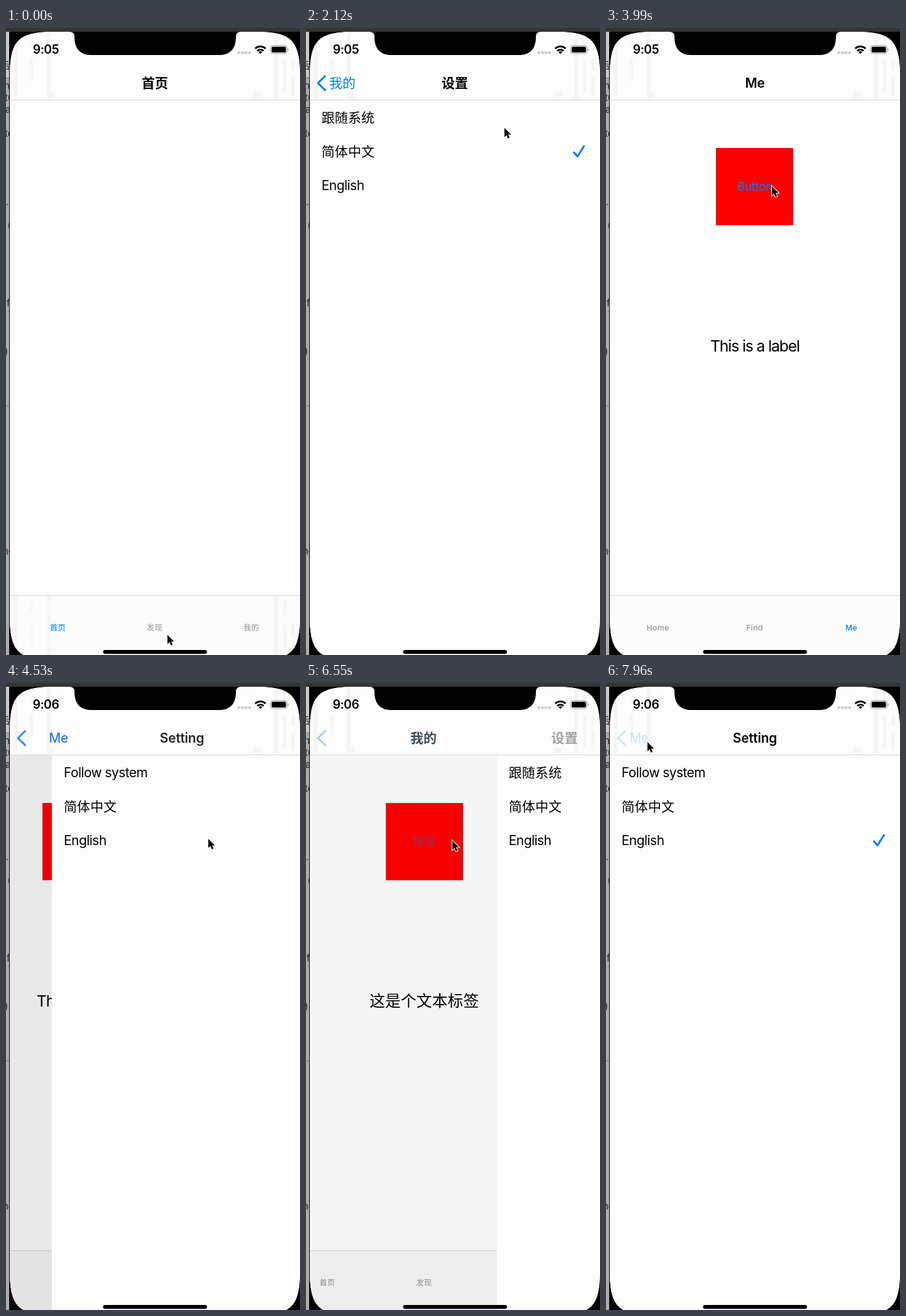
Recreate the animation shown at these times as an HTML page. Size 468x998 px, loop 8000 ms.

```html
<!DOCTYPE html>
<html lang="zh-CN">
<head>
<meta charset="utf-8">
<title>Language settings</title>
<style>
  html, body { margin: 0; width: 100%; height: 100%; overflow: hidden; background: #000; }
  svg { display: block; width: 468px; height: 998px; }
  text { font-family: Inter, "Noto Sans CJK SC", "Noto Sans CJK", sans-serif; font-size: 20.9px; letter-spacing: -.026em; fill: #000; }
  .mid { text-anchor: middle; }
  .bold { font-weight: 600; letter-spacing: -.01em; }
  .blue { fill: #007aff; }
  .label { font-size: 24.7px; letter-spacing: -.045em; }
  .button { font-size: 18.5px; letter-spacing: -.01em; fill: #007aff; }
  .tabs text { font-size: 12.3px; font-weight: 500; letter-spacing: .02em; text-anchor: middle; }
  .zh text, text.zh { letter-spacing: .008em; }
  #stage .clock { font-size: 19.4px; letter-spacing: -.025em; }
  #stage .latin { letter-spacing: -.024em; }
  #stage .desk text { font-size: 15px; fill: #222; letter-spacing: 0; }
  .line { stroke: #d4d4d4; }
  .mark { fill: none; stroke: #007aff; stroke-width: 3; stroke-linecap: round; stroke-linejoin: round; }
</style>
</head>
<body>
<svg id="stage" viewBox="0 0 468 998">
  <defs>
    <clipPath id="screen">
      <path d="M6 79C6 19 19 6 79 6H395C455 6 468 19 468 79V933C468 993 455 1006 395 1006H79C19 1006 6 993 6 933Z"/>
    </clipPath>
    <clipPath id="edge"><rect width="5" height="998"/></clipPath>
    <filter id="soft"><feGaussianBlur stdDeviation="1"/></filter>
    <g id="haze" fill="#f4f4f4" filter="url(#soft)">
      <path d="M12 6h6v106h-6zM65 6h6v106h-6zM427 6h6v106h-6z"/>
      <path d="M39 14h4v16h-4zM39 52h4v34h-4zM441 12h5v24h-5zM441 52h5v50h-5zM454 50h6v18h-6zM454 78h6v30h-6z"/>
      <path d="M66 102h11v9h-11zM394 103h13v8h-13z"/>
    </g>
  </defs>

  <rect width="468" height="998" fill="#b1abab"/>
  <rect width="6" height="80" fill="#cbc8c8"/>
  <g class="desk" id="desk" clip-path="url(#edge)"><path d="M0 79.500h6M0 601.500h6" stroke="#777"/></g>
  <rect x="5" y="0" width="463" height="998"/>
  <rect width="468" height="6" fill="#343434"/>

  <g clip-path="url(#screen)">
    <rect x="6" y="6" width="462" height="992" fill="#fdfdfd"/>
    <g id="under">
      <rect x="6" y="114" width="462" height="884" fill="#fdfdfd"/>
      <g id="me">
        <rect x="175.400" y="190.700" width="123" height="123" fill="#f00" shape-rendering="crispEdges"/>
        <text class="mid button" id="button" x="237" y="258.700"/>
        <text class="mid label" id="label" x="237" y="514.800"/>
      </g>
      <rect id="tabBack" x="6" y="904" width="462" height="94"/>
      <use href="#haze" id="tabHaze" y="898"/>
      <path class="line" d="M6 903.500h462"/>
      <g class="tabs" id="tabs"></g>
      <rect id="dim" x="6" y="114" width="462" height="884"/>
    </g>
    <g id="over">
      <rect x="6" y="114" width="462" height="884" fill="#fdfdfd" shape-rendering="crispEdges"/>
      <g id="rows"></g>
      <path class="mark" id="check" d="M426.500 198l5.800 6.500L442.500 188"/>
    </g>

    <rect x="6" y="6" width="462" height="108" fill="#fdfdfd"/>
    <use href="#haze"/>
    <path class="line" d="M6 114.500h462"/>
    <path class="mark" id="chevron" d="M30.500 76.500L19 87.700l11.500 11.200"/>
    <text class="mid blue" id="backLabel" y="95"/>
    <text class="mid bold" id="meTitle" y="95"/>
    <text class="mid bold" id="setTitle" y="95"/>

    <text class="mid bold clock" id="clock" x="63.400" y="41.200"/>
    <g fill="#c9c9c9"><circle cx="370.500" cy="39.300" r="2.300"/><circle cx="376.500" cy="39.300" r="2.300"/><circle cx="382" cy="39.300" r="2.300"/><circle cx="387.600" cy="39.300" r="2.300"/></g>
    <g fill="none" stroke="#000" stroke-width="2.700">
      <path d="M396.700 32.800a12 12 0 0 1 16.600 0M400 36.400a7.300 7.300 0 0 1 10 0"/>
    </g>
    <path d="M405 41.300l-2.900-3a4.200 4.200 0 0 1 5.800 0z"/>
    <rect x="421" y="28" width="26.500" height="12.800" rx="3.600" fill="none" stroke="#999"/>
    <rect x="422.800" y="29.800" width="22.900" height="9.200" rx="2.100"/>
    <path d="M449 32.300q2 2 0 4.400z" fill="#888"/>
    <path d="M101 6Q109 6 109 14C109 33 118 43 136 43H339C357 43 366 33 366 14Q366 6 374 6Z"/>
    <rect x="154.500" y="990" width="165.500" height="6.200" rx="3.100"/>
  </g>

  <circle id="touch" r="24.500" fill="#ccc" fill-opacity=".9" stroke="#999"/>
  <path id="cursor" d="M0 0V14.500L3.300 11.500L5.700 16.800L8.200 15.700L5.900 10.600H10.500Z" stroke="#fff" stroke-width="2" paint-order="stroke"/>
</svg>

<script>
const LOOP = 8000, WIDTH = 462, SLIDE = 500, PARALLAX = .297;
const $ = id => document.getElementById(id);

const words = {
  zh: { home: '首页', find: '发现', me: '我的', set: '设置', system: '跟随系统', button: '按钮', label: '这是个文本标签', back: 58 },
  en: { home: 'Home', find: 'Find', me: 'Me', set: 'Setting', system: 'Follow system', button: 'Button', label: 'This is a label', back: 52.5 }
};

// Timeline, in ms
const TAB_AT = 620, MINUTE_AT = 4350;
const slides = [[1580, 0], [3087, 1], [4294, 0], [5870, 1], [6483, 0]];
const choices = [[0, 'zh', 1], [2560, 'en', 0], [5200, 'zh', 1], [7420, 'en', 2]];
const touches = [[450, 600], [1350, 1470], [2440, 2550], [2910, 3060], [4120, 4260],
  [5080, 5190], [5750, 5850], [6350, 6460], [7300, 7410]];
const backPresses = [[2910, 3087], [5750, 5870], [7950, 8000]];
const buttonPresses = [[1350, 1570], [4120, 4294], [6350, 6483]];
const path = [[90, 257, 966], [430, 415, 969], [890, 415, 969], [1320, 281, 306], [1600, 281, 306],
  [2210, 318, 150], [2560, 318, 150], [2880, 46, 88], [3040, 46, 88], [3280, 310, 246],
  [3750, 264, 252], [4270, 264, 252], [4530, 322, 248], [5000, 318, 206], [5200, 318, 206],
  [5560, 42, 70], [5860, 42, 70], [6300, 233, 251], [6560, 233, 251], [6980, 290, 262],
  [7430, 290, 262], [7780, 66, 94]];

// Title travel against page travel
const pushTitle = [[0, 0], [.147, .17], [.65, .726], [1, 1]];
const popTitle = [[0, 0], [.768, .737], [1, 1]];
const pushSet = [[0, 0], [.147, 43.5], [.65, 176], [1, 235]];
const popSet = [[0, 0], [.768, 189.5], [1, 235]];

const linear = u => u;
const smooth = u => u * u * (3 - 2 * u);
const within = (t, spans) => spans.some(([a, b]) => t >= a && t < b);
const latest = (t, list) => list.filter(item => t >= item[0]).pop();

function sample(keys, t, col = 1, ease = linear) {
  const i = keys.findIndex(k => k[0] > t);
  if (i === 0) return keys[0][col];
  if (i < 0) return keys[keys.length - 1][col];
  const a = keys[i - 1], b = keys[i];
  return a[col] + (b[col] - a[col]) * ease((t - a[0]) / (b[0] - a[0]));
}

function addText(parent, x, y, str = '', cls = '') {
  const el = document.createElementNS('http://www.w3.org/2000/svg', 'text');
  el.setAttribute('x', x);
  el.setAttribute('y', y);
  el.setAttribute('class', cls);
  el.textContent = str;
  return parent.appendChild(el);
}

function setText(el, str) {
  if (el.textContent !== str) el.textContent = str;
}

const set = (el, name, value) => el.setAttribute(name, value);
const show = (el, on) => set(el, 'visibility', on ? 'visible' : 'hidden');
const shift = (el, x, y = 0) => set(el, 'transform', `translate(${x} ${y})`);

// Slivers of the window behind the phone
[['后', -9, 65], ['n:', -3, 97], ['tu', -2, 116], ['a', -1, 135], ['te', -2, 173], ['.', 0, 282], ['u', 3, 320],
  ['f', 1, 443], ['`', 3, 462], [')', -2, 520], ['nd', -5, 838]].forEach(([s, x, y]) => addText($('desk'), x, y, s));

const tabs = [82.5, 236.5, 390.5].map(x => addText($('tabs'), x, 959.4));
const systemRow = addText($('rows'), 24.8, 149.6);
addText($('rows'), 24.8, 203.8, '简体中文', 'zh');
addText($('rows'), 24.8, 257.6, 'English', 'latin');

// 1 = first level in place, 0 = settings in place
function slideState(t) {
  const last = latest(t, slides);
  if (!last) return { p: 1, popping: true };
  const left = (1 - Math.min(1, (t - last[0]) / SLIDE)) ** 3;
  return last[1] ? { p: 1 - left, popping: true } : { p: left, popping: false };
}

function buttonAlpha(t) {
  if (within(t, buttonPresses)) return .2;
  const last = latest(t, buttonPresses);
  return last ? Math.min(1, .2 + .8 * (t - last[1]) / 400) : 1;
}

function render(t) {
  const { p, popping } = slideState(t);
  const [, lang, checked] = latest(t, choices);
  const w = words[lang], onMe = t >= TAB_AT;
  set($('stage'), 'class', lang);

  // Pages
  shift($('under'), -PARALLAX * WIDTH * (1 - p));
  shift($('over'), WIDTH * p);
  set($('dim'), 'opacity', .09 * (1 - p));
  show($('over'), p < 1);
  show($('me'), onMe);
  setText($('button'), w.button);
  set($('button'), 'opacity', buttonAlpha(t));
  setText($('label'), w.label);
  setText(systemRow, w.system);
  shift($('check'), 0, (checked - 1) * 54);

  // Tab bar
  set($('tabBack'), 'fill', p < 1 ? '#f6f6f6' : '#fcfcfc');
  show($('tabHaze'), p === 1 && lang === 'zh');
  [w.home, w.find, w.me].forEach((s, i) => {
    setText(tabs[i], s);
    tabs[i].style.fill = i === (onMe ? 2 : 0) ? '#007aff' : '#929292';
  });

  // Navigation bar
  const titleX = w.back + (237 - w.back) * sample(popping ? popTitle : pushTitle, p);
  const backAlpha = within(t, backPresses) ? .2 : 1 - p;
  set($('chevron'), 'opacity', backAlpha);
  setText($('backLabel'), w.me);
  set($('backLabel'), 'x', titleX);
  set($('backLabel'), 'opacity', backAlpha);
  setText($('meTitle'), onMe ? w.me : w.home);
  set($('meTitle'), 'x', titleX);
  set($('meTitle'), 'opacity', p);
  setText($('setTitle'), w.set);
  set($('setTitle'), 'x', 237 + sample(popping ? popSet : pushSet, p));
  set($('setTitle'), 'opacity', 1 - p);
  setText($('clock'), t < MINUTE_AT ? '9:05' : '9:06');

  // Pointer
  const x = sample(path, t, 1, smooth), y = sample(path, t, 2, smooth);
  shift($('cursor'), x, y);
  shift($('touch'), x + 2.5, y - .5);
  show($('touch'), within(t, touches));
}

function tick() {
  render(performance.now() % LOOP);
  requestAnimationFrame(tick);
}
tick();
</script>
</body>
</html>
```
